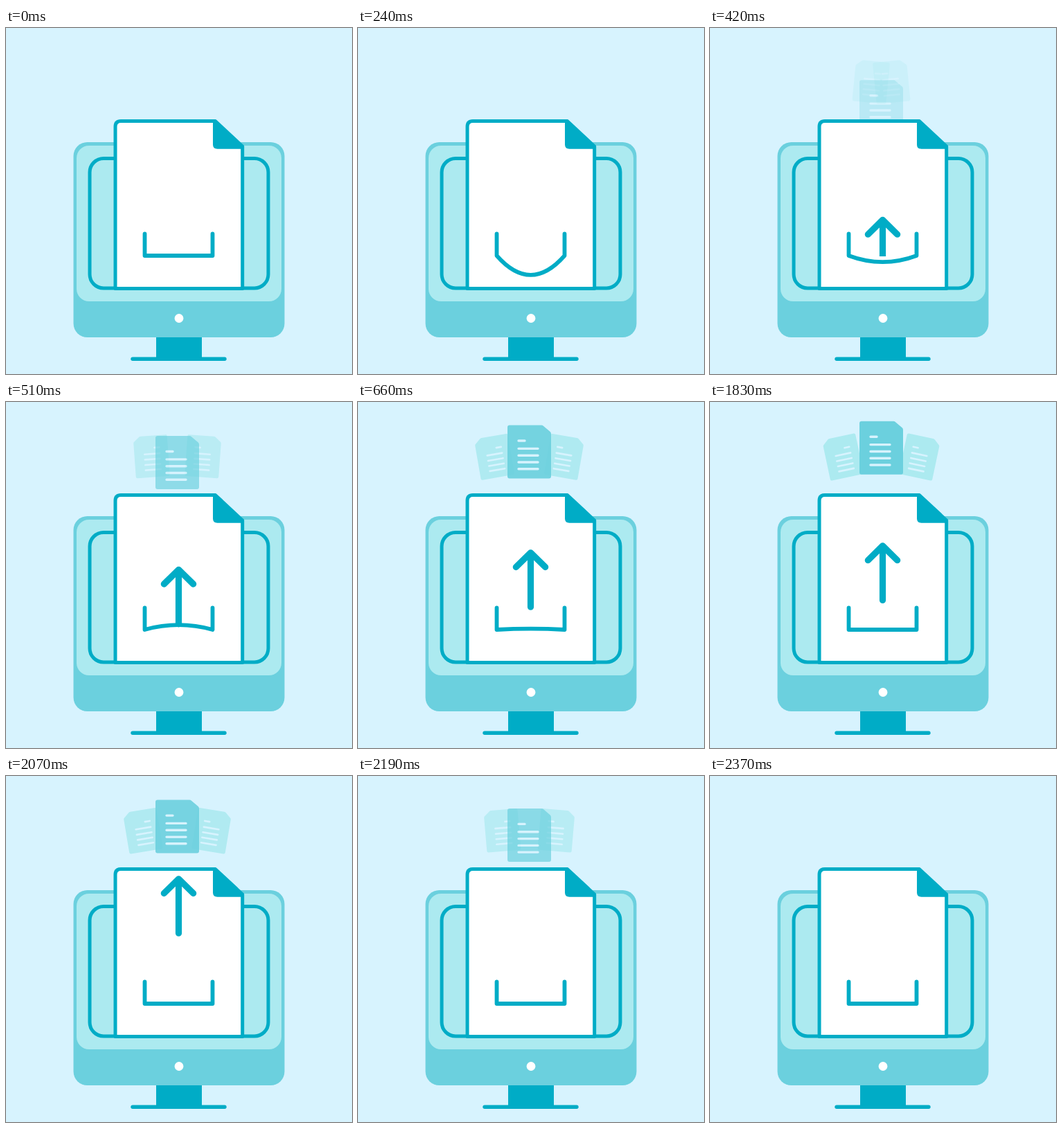
Write an HTML page that moves like this. It is 500 px wide and 500 px high and loops after 2730 ms.

```html
<!DOCTYPE html>
<html lang="en">
<head>
<meta charset="utf-8">
<title>Upload</title>
<style>
  html, body { margin: 0; width: 100%; height: 100%; overflow: hidden; background: #d7f3fe; }
  svg { display: block; width: 100vw; height: 100vh; }
</style>
</head>
<body>
<svg viewBox="0 0 500 500">
  <defs>
    <clipPath id="slot"><rect x="160" y="137" width="180" height="193"/></clipPath>
    <!-- small document, centred on 0,0 -->
    <g id="doc">
      <path d="M-28.5-38.5H17.5Q19.3-38.5 20.5-37.4L30.3-29Q31.5-28 31.5-26V35.5Q31.5 38.5 28.5 38.5H-28.5Q-31.5 38.5-31.5 35.5V-35.5Q-31.5-38.5-28.5-38.5Z"/>
      <path d="M-15.5-16H-6.5M-15.5-4.7H12.5M-15.5 5.2H12.5M-15.5 15H12.5M-15.5 24.7H12.5"
        stroke="#d7f3fe" stroke-width="3.4" stroke-linecap="round"/>
    </g>
  </defs>

  <rect x="97.5" y="165" width="305" height="282" rx="20" fill="#6bd0de"/>
  <rect x="102" y="170" width="296" height="225" rx="18" fill="#aceaf0"/>
  <rect x="121" y="188.5" width="258" height="187.5" rx="20" fill="none" stroke="#00acc6" stroke-width="5"/>
  <circle cx="250" cy="419.5" r="6.4" fill="#fff"/>
  <path d="M217 447H283V478H217Z" fill="#00acc6"/>
  <path d="M183 478.2H316" stroke="#00acc6" stroke-width="5.4" stroke-linecap="round"/>

  <use id="left" href="#doc" fill="#aceaf0"/>
  <use id="right" href="#doc" fill="#aceaf0"/>
  <use id="middle" href="#doc" fill="#6bd0de"/>

  <g stroke="#00acc6" fill="none" stroke-linecap="round" stroke-linejoin="round">
    <path d="M158 376.5V142.5Q158 134.5 166 134.5H302.5L341.7 171V376.5Z" fill="#fff" stroke-width="5"/>
    <path d="M299 135H303L343.5 171V174.7H305.5Q299 174.7 299 168.5Z" fill="#00acc6" stroke="none"/>
    <path id="tray" stroke-width="5.8"/>
    <g clip-path="url(#slot)">
      <path id="arrow" d="M249.5 286.5V208M228.3 228.8L249.5 208L270.7 228.8" stroke-width="9.2"/>
    </g>
  </g>
</svg>
<script>
const LOOP = 2730;
const el = id => document.getElementById(id);
const mix = (a, b, p) => a + (b - a) * p;
const clamp = x => Math.min(1, Math.max(0, x));
const smooth = x => x * x * (3 - 2 * x);

// cubic-bezier(.167, 0, 0, 1), solved by bisection
function ease(x) {
  let lo = 0, hi = 1;
  for (let i = 0; i < 24; i++) {
    const s = (lo + hi) / 2;
    if (0.501 * s * (1 - s) ** 2 + s ** 3 < x) lo = s; else hi = s;
  }
  return x <= 0 ? 0 : x >= 1 ? 1 : smooth(lo);
}
const rise = (t, from, to) => ease(clamp((t - from) / (to - from)));
const fall = (t, from, to) => ease(clamp((to - t) / (to - from)));

// tray depth: [time, sag]
const SAG = [[0, 0], [300, 31], [520, -7], [720, 0], [LOOP, 0]];
function sagAt(t) {
  const i = SAG.findIndex(k => k[0] > t);
  const [t0, a] = SAG[i - 1], [t1, b] = SAG[i];
  return mix(a, b, smooth((t - t0) / (t1 - t0)));
}

function place(id, p, transform) {
  el(id).setAttribute("transform", transform);
  el(id).setAttribute("opacity", p);
}

function draw(t) {
  const p = t < 1200 ? rise(t, 360, 900) : fall(t, 1815, 2355);
  const spread = 55.5 * p, tilt = mix(-12, 12, p), y = mix(77, 79.5, p);
  place("left", p, `translate(${247.5 - spread} ${y}) rotate(${-tilt}) scale(-.78 .78)`);
  place("right", p, `translate(${247.5 + spread} ${y}) rotate(${tilt}) scale(.78)`);
  place("middle", p, `translate(247.5 ${mix(131, 66.3, p)})`);

  const lift = t < 1200
    ? 130 * (1 - rise(t, 320, 900))
    : -156 * (1 - fall(t, 1815, 2155));
  el("arrow").setAttribute("transform", `translate(0 ${lift})`);

  el("tray").setAttribute("d", `M200.5 297.5V329Q249.5 ${329 + 2 * sagAt(t)} 298.5 329V297.5`);
}

const start = performance.now();
function tick() {
  draw((performance.now() - start) % LOOP);
  requestAnimationFrame(tick);
}
tick();
</script>
</body>
</html>
```
